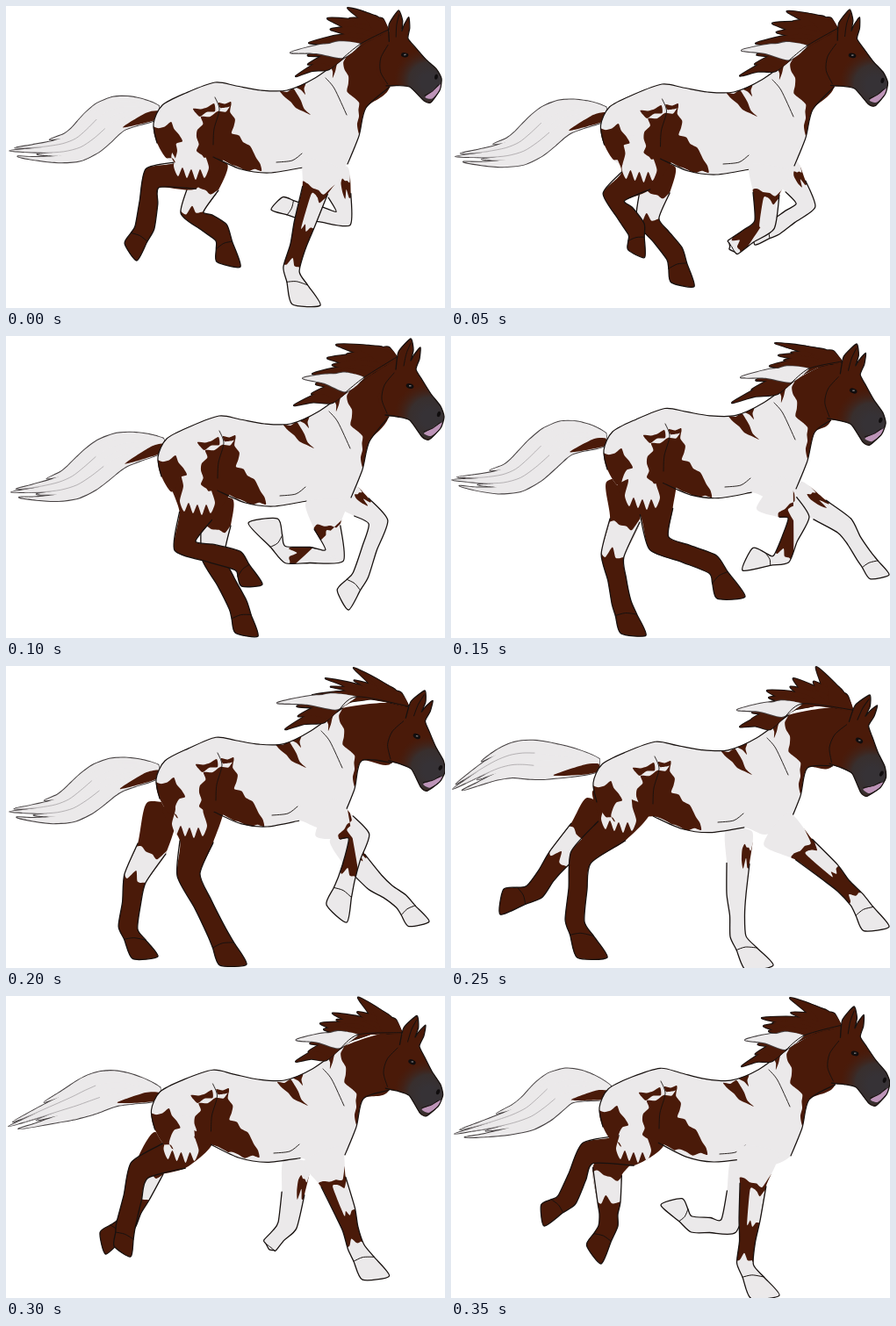
An HTML page with a canvas for the animation above (0.4 s loop, 500x344 px).

```html
<!DOCTYPE html>
<html lang="en">
<head>
<meta charset="utf-8">
<title>Galloping horse</title>
<style>
html, body { margin: 0; width: 100%; height: 100%; overflow: hidden; background: #fff; }
canvas { display: block; width: 500px; height: 344px; }
</style>
</head>
<body>
<canvas id="stage" width="500" height="344"></canvas>
<script>
const ctx = document.getElementById('stage').getContext('2d');
const BROWN = '#4a1a09', WHITE = '#ebe9ea', INK = '#17110f', SOFT = '#454041';
const LOOP = 400, STEP = 50;
// Key pose shown at each step; halves are in-between poses.
const ORDER = [0, 0.5, 1, 2, 3, 4, 4.5, 5];

// shift: rump and shoulder; head: ear tip and chin; tail: spine; mane: lock tips;
// legs: top, knee, hock, fetlock and toe.
const KEYS = [
  {
    shift: '0,0 0,0', head: '447,5 482,109',
    tail: '174,121 124,124 76,159 4,165',
    mane: '389,2 366,14 345,42 324,53 330,80',
    farHind: '235,175 226,204 212,235 245,258 267,297',
    nearHind: '215,160 205,193 167,196 158,252 149,290',
    farFront: '374,186 380,216 384,242 334,233 302,232',
    nearFront: '362,180 352,210 340,248 325,300 358,341'
  },
  {
    shift: '5,4 4,4', head: '461,3 480,117',
    tail: '180,124 125,132 72,168 6,178',
    mane: '376,10 366,25 349,43 338,48 328,79',
    farHind: '240,185 239,215 236,252 264,306 287,342',
    nearHind: '222,166 216,205 204,239 264,256 292,283',
    farFront: '385,180 405,195 424,212 404,272 390,312',
    nearFront: '365,188 366,218 374,250 318,249 276,213'
  },
  {
    shift: '6,-4 4,-6', head: '462,9 475,123',
    tail: '176,118 126,118 70,160 1,164',
    mane: '369,8 373,22 363,34 330,47 320,76',
    farHind: '195,165 198,210 184,250 194,303 222,341',
    nearHind: '222,160 234,200 237,236 298,260 335,297',
    farFront: '390,178 420,198 448,216 470,250 499,272',
    nearFront: '362,178 384,195 396,207 376,254 332,267'
  },
  {
    shift: '3,-5 -5,-8', head: '477,28 478,141',
    tail: '174,120 120,126 68,160 4,166',
    mane: '396,2 364,14 349,33 309,42 318,72',
    farHind: '178,160 166,208 147,242 139,298 173,331',
    nearHind: '213,158 217,200 208,238 240,303 274,340',
    farFront: '382,192 398,222 420,246 450,268 482,291',
    nearFront: '362,172 388,184 402,194 388,242 388,292'
  },
  {
    shift: '-6,-1 -4,0', head: '477,33 472,147',
    tail: '168,113 112,108 62,109 2,140',
    mane: '416,1 390,14 360,28 326,50 329,69',
    farHind: '170,160 150,190 122,220 95,257 56,283',
    nearHind: '195,152 183,188 148,218 141,290 178,332',
    farFront: '328,188 327,225 325,260 327,308 367,341',
    nearFront: '370,185 402,209 432,235 462,266 499,297'
  },
  {
    shift: '1,-7 -2,2', head: '459,12 482,124',
    tail: '181,110 130,103 82,136 4,157',
    mane: '386,2 354,25 356,34 335,50 331,80',
    farHind: '198,170 178,200 180,235 179,262 171,305',
    nearHind: '212,152 200,176 156,179 132,232 106,262',
    farFront: '334,190 327,225 316,262 274,260 239,238',
    nearFront: '350,175 344,215 340,255 335,305 374,341'
  }
];

const points = s => s.split(' ').map(p => p.split(',').map(Number));
const mix = (a, b, t) => [a[0] + (b[0] - a[0]) * t, a[1] + (b[1] - a[1]) * t];
const push = (p, n, d) => [p[0] + n[0] * d, p[1] + n[1] * d];
const range = (n, f) => Array.from({ length: n }, (_, i) => f(i));

// Unit normal that points to the front of a limb running down from a to b.
function normal(a, b) {
  const x = b[0] - a[0], y = b[1] - a[1], d = Math.hypot(x, y) || 1;
  return [y / d, -x / d];
}

function seeded(seed) {
  return () => (seed = (seed * 16807) % 2147483647) / 2147483647;
}

// Splits each edge and moves the new points sideways for a ragged coat edge.
function ragged(s, size, seed) {
  const rnd = seeded(seed), p = points(s);
  return p.flatMap((a, i) => {
    const b = p[(i + 1) % p.length], n = normal(a, b);
    const parts = Math.max(1, Math.round(Math.hypot(a[0] - b[0], a[1] - b[1]) / 8));
    return range(parts, j => push(mix(a, b, j / parts), n, j ? (rnd() - 0.5) * size : 0));
  });
}

const BODY = points('388,56 352,82 320,96 290,96 262,91 238,87 205,99 178,113 168,134 172,156 190,178 236,172 268,186 300,190 338,184 362,192 389,180 402,148 410,116');
const HEAD = points('444,38 447,18 461,3 464,16 461,28 465,21 472,13 471,26 467,38 474,50 484,66 495,80 499,92 495,105 482,118 474,115 460,96 446,92 432,90');
const LIPS = points('498,98 484,106 476,111 484,114 494,106');
const RUMP_MARKS = [
  ragged('241,120 256,113 257,145 270,155 291,188 242,184 217,165 222,126', 9, 41),
  ragged('213,117 237,111 238,120 221,126', 5, 8),
  ragged('242,110 256,109 256,114 244,116', 4, 5),
  ragged('164,136 188,132 201,154 191,162 194,181 170,164', 9, 23)
];
const SHOULDER_MARKS = [
  ragged('396,38 388,56 390,80 396,104 402,126 404,150 450,140 490,40 440,0', 12, 77),
  ragged('312,97 327,94 336,108 347,124 330,116', 5, 12),
  ragged('330,92 341,88 341,101', 3, 9),
  ragged('370,68 382,59 372,82', 4, 31)
];
const DRIP = [[222, 146], [227, 170],
  ...range(9, i => [231 - i * 5, 187 + (i % 2) * 11 - Math.abs(i - 3)]),
  [195, 165], [193, 146]];

function poseAt(step) {
  const i = Math.floor(step), t = step - i;
  const a = KEYS[i], b = KEYS[Math.ceil(step)], pose = {};
  for (const name in a) {
    const to = points(b[name]);
    pose[name] = points(a[name]).map((p, n) => mix(p, to[n], t));
  }
  return pose;
}

// Point on a smooth curve through p, u from 0 to 1.
function along(p, u) {
  const x = Math.max(0, Math.min(0.9999, u)) * (p.length - 1), i = Math.floor(x), t = x - i;
  const at = j => p[Math.max(0, Math.min(p.length - 1, j))];
  const [a, b, c, d] = [at(i - 1), at(i), at(i + 1), at(i + 2)];
  return [0, 1].map(k => b[k] + t / 2 * (c[k] - a[k] +
    t * (2 * a[k] - 5 * b[k] + 4 * c[k] - d[k] + t * (3 * (b[k] - c[k]) + d[k] - a[k]))));
}

// Smooth path through the points; k sets roundness.
function trace(p, k, closed) {
  const n = p.length;
  const at = i => closed ? p[(i + n) % n] : p[Math.max(0, Math.min(n - 1, i))];
  ctx.beginPath();
  ctx.moveTo(...p[0]);
  for (let i = 0; i < (closed ? n : n - 1); i++) {
    const a = at(i - 1), b = at(i), c = at(i + 1), d = at(i + 2);
    ctx.bezierCurveTo(b[0] + (c[0] - a[0]) * k, b[1] + (c[1] - a[1]) * k,
      c[0] - (d[0] - b[0]) * k, c[1] - (d[1] - b[1]) * k, c[0], c[1]);
  }
}

function fill(p, color, k = 0.12) {
  trace(p, k, true);
  ctx.fillStyle = color;
  ctx.fill();
}

function line(p, width = 1.2, color = INK, k = 0.14) {
  trace(p, k, false);
  ctx.lineWidth = width;
  ctx.strokeStyle = color;
  ctx.stroke();
}

// Fills overlapping shapes as one, with a single outline around them.
function merge(shapes, color, edge) {
  shapes.forEach(p => line([...p, p[0]], 2, edge, 0.12));
  shapes.forEach(p => fill(p, color));
}

function within(p, k, draw) {
  ctx.save();
  trace(p, k, true);
  ctx.clip();
  draw();
  ctx.restore();
}

function shifted([x, y], draw) {
  ctx.save();
  ctx.translate(x, y);
  draw();
  ctx.restore();
}

// Outline of a leg: down the front, round the hoof and up the back.
function legOutline([top, knee, hock, fetlock, toe], widths) {
  const bones = [top, knee, hock, mix(hock, fetlock, 0.5), fetlock];
  const side = sign => bones.map((p, i) =>
    push(p, normal(bones[Math.max(0, i - 1)], bones[Math.min(4, i + 1)]), sign * widths[i]));
  const front = side(1), back = side(-1);
  const x = toe[0] - fetlock[0], y = toe[1] - fetlock[1];
  const heel = [fetlock[0] + x * 0.6 - y * 0.46, fetlock[1] + x * 0.46 + y * 0.6];
  return [...front, mix(front[4], toe, 0.4), toe,
    heel, mix(back[4], heel, 0.4), ...back.reverse()];
}

// Point on a leg: t runs from top (0) to toe (6), s from front (0) to back (1).
function onLeg(leg, t, s) {
  const i = Math.floor(t), edge = (a, b) => mix(leg[a], leg[b], t - i);
  return mix(edge(i, i + 1), edge(13 - i, 12 - i), s);
}

// Patch over part of a leg with jagged ends.
function patch(leg, [color, t0, t1, s0, s1], seed) {
  const rnd = seeded(seed);
  const end = t => range(6, i => onLeg(leg, t + (rnd() - 0.5) * 0.4, s0 + (s1 - s0) * i / 5));
  fill([...end(t0), ...end(t1).reverse()], color);
}

function drawLeg(joints, widths, color, marks = []) {
  const leg = legOutline(joints, widths);
  fill(leg, color);
  within(leg, 0.12, () => marks.forEach((m, i) => patch(leg, m, 91 + i)));
  line(leg.slice(1, -1), 1.3, INK, 0.12);
  line([onLeg(leg, 5, 0), onLeg(leg, 4.85, 0.5), onLeg(leg, 5, 1)], 1);
}

const HIND = [34, 19, 13, 10.5, 11], FAR_HIND = [18, 17, 13, 10.5, 11];
const FRONT = [23, 15, 12, 9, 9.5], FAR_FRONT = [15, 13, 11, 8.5, 9];
const SOCK = [[WHITE, 1.05, 1.95, -0.1, 1.1]];
const SPOT = [[BROWN, 0.4, 1, -0.1, 0.35]];
const SPLASH = [[BROWN, 0.85, 3.7, -0.1, 1.1], [WHITE, 1.3, 2.1, -0.1, 0.6]];

function drawTail(spine) {
  const rnd = seeded(15);
  const at = (u, s) => push(along(spine, u), normal(along(spine, u - 0.03), along(spine, u + 0.03)),
    s * (7 + 15 * Math.sin(Math.PI * Math.min(1, u))));
  const strands = range(5, j => {
    const mid = (j - 2) * 0.34, end = j === 2 ? 1 : 0.78 + rnd() * 0.18;
    const edge = sign => range(10, i => {
      const v = i / 10;
      return at(v * end, mid + sign * 0.36 * (1 - v ** 4));
    });
    return [...edge(-1), at(end, mid), ...edge(1).reverse()];
  });
  merge(strands, WHITE, SOFT);
  fill([at(0, -0.2), at(0.12, 0.1), at(0.3, 0.85), at(0.12, 1), at(0, 1)], BROWN);
  for (const s of [-0.35, 0.3])
    line(range(6, i => at(0.45 + i * 0.09, s * (1 - i * 0.08))), 0.7, '#9d999b');
}

function drawMane(tips, poll, shoulder) {
  const rnd = seeded(33);
  const crest = [poll, push([404, 43], shoulder, 1), push([368, 72], shoulder, 1)];
  const base = i => 0.12 + i * 0.18;
  const lock = (i, tip, spread) => {
    const a = along(crest, base(i) - spread), b = along(crest, base(i) + spread);
    const bend = (p, lift) => push(mix(p, tip, 0.5), [0, -1], lift);
    return [a, bend(a, 6), tip, bend(b, 2), b];
  };
  const brown = [0, 1, 2, 4].map(i => lock(i, tips[i], 0.16));
  for (let j = 0; j < 9; j++) {
    const i = j * 0.45, n = Math.floor(i);
    const tip = mix(tips[n], tips[n + 1], i - n);
    brown.push(lock(i, mix(tip, along(crest, base(i)), 0.15 + rnd() * 0.35), 0.13));
  }
  // Short tufts between the ears and the first lock.
  for (const t of [0.25, 0.5, 0.75])
    brown.push(lock(0, push(mix(poll, tips[0], t), [0, -1], 9 * (1 - t)), 0.12));
  merge(brown, BROWN, INK);
  merge([lock(3, tips[3], 0.1), lock(2.7, mix(tips[3], crest[1], 0.35), 0.1)], WHITE, SOFT);
  line([poll, crest[1], mix(crest[1], crest[2], 0.6)], 1);
}

// Turns and scales the head so that ear tip and chin meet the pose.
function headMatrix([ear, chin]) {
  const x = chin[0] - ear[0], y = chin[1] - ear[1], u = 19, v = 114, d = u * u + v * v;
  const c = (x * u + y * v) / d, s = (y * u - x * v) / d;
  return [c, s, -s, c, ear[0] - c * 461 + s * 3, ear[1] - s * 461 - c * 3];
}

function drawHead(matrix) {
  ctx.save();
  ctx.transform(...matrix);
  fill([...HEAD, [424, 68]], BROWN, 0.1);
  within(HEAD, 0.1, () => {
    const shade = ctx.createRadialGradient(484, 94, 10, 480, 91, 38);
    shade.addColorStop(0, '#363236');
    shade.addColorStop(0.45, '#382f2e');
    shade.addColorStop(1, 'rgba(66,32,20,0)');
    ctx.fillStyle = shade;
    ctx.fillRect(420, 40, 85, 85);
    fill(LIPS, '#bd94b8');
  });
  line(HEAD, 1.3, INK, 0.1);
  line(points('453,34 456,20 461,8'), 1);
  line(points('442,42 431,56 428,72 434,88'), 0.9);
  line(points('476,109 486,105 494,99'), 1);
  ctx.fillStyle = '#100d0e';
  for (const [x, y, w, h] of [[460, 57, 4.5, 2.8], [493, 89, 2, 3.2]]) {
    ctx.beginPath();
    ctx.ellipse(x, y, w, h, 0.3, 0, 7);
    ctx.fill();
  }
  ctx.fillStyle = '#77706f';
  ctx.fillRect(459, 56, 2.5, 1.5);
  ctx.restore();
}

function drawCoat(body, hip, [rump, shoulder]) {
  shifted([hip[0] - 215, hip[1] - 160], () => fill(DRIP, WHITE));
  within(body, 0.14, () => {
    shifted(rump, () => RUMP_MARKS.forEach(m => fill(m, BROWN)));
    shifted(shoulder, () => SHOULDER_MARKS.forEach(m => fill(m, BROWN)));
  });
  shifted(rump, () => line(points('238,104 243,118 237,140 236,158'), 0.9));
  shifted(shoulder, () => {
    line(points('364,82 374,94 388,124'), 0.9);
    line(points('308,178 326,176 337,168'), 0.9);
  });
  line(body.slice(0, 10));
  line(body.slice(11, 15));
  line(body.slice(16, 20));
}

function draw(pose) {
  const [rump, shoulder] = pose.shift;
  const matrix = headMatrix(pose.head);
  const [a, b, c, d, e, f] = matrix;
  const onHead = (x, y) => [a * x + c * y + e, b * x + d * y + f];
  const poll = onHead(445, 24);
  const body = BODY.map(p =>
    push(p, mix(rump, shoulder, Math.max(0, Math.min(1, (p[0] - 200) / 150))), 1));
  body.push(onHead(436, 92), poll);

  ctx.fillStyle = '#fff';
  ctx.fillRect(0, 0, 500, 344);
  ctx.lineJoin = ctx.lineCap = 'round';
  drawTail(pose.tail);
  drawLeg(pose.farHind, FAR_HIND, BROWN, SOCK);
  drawLeg(pose.farFront, FAR_FRONT, WHITE, SPOT);
  fill(body, WHITE, 0.14);
  drawLeg(pose.nearHind, HIND, BROWN);
  drawCoat(body, pose.nearHind[0], pose.shift);
  drawLeg(pose.nearFront, FRONT, WHITE, SPLASH);
  drawMane(pose.mane, poll, shoulder);
  drawHead(matrix);
}

function tick() {
  draw(poseAt(ORDER[Math.floor(performance.now() % LOOP / STEP)]));
  requestAnimationFrame(tick);
}
tick();
</script>
</body>
</html>
```
